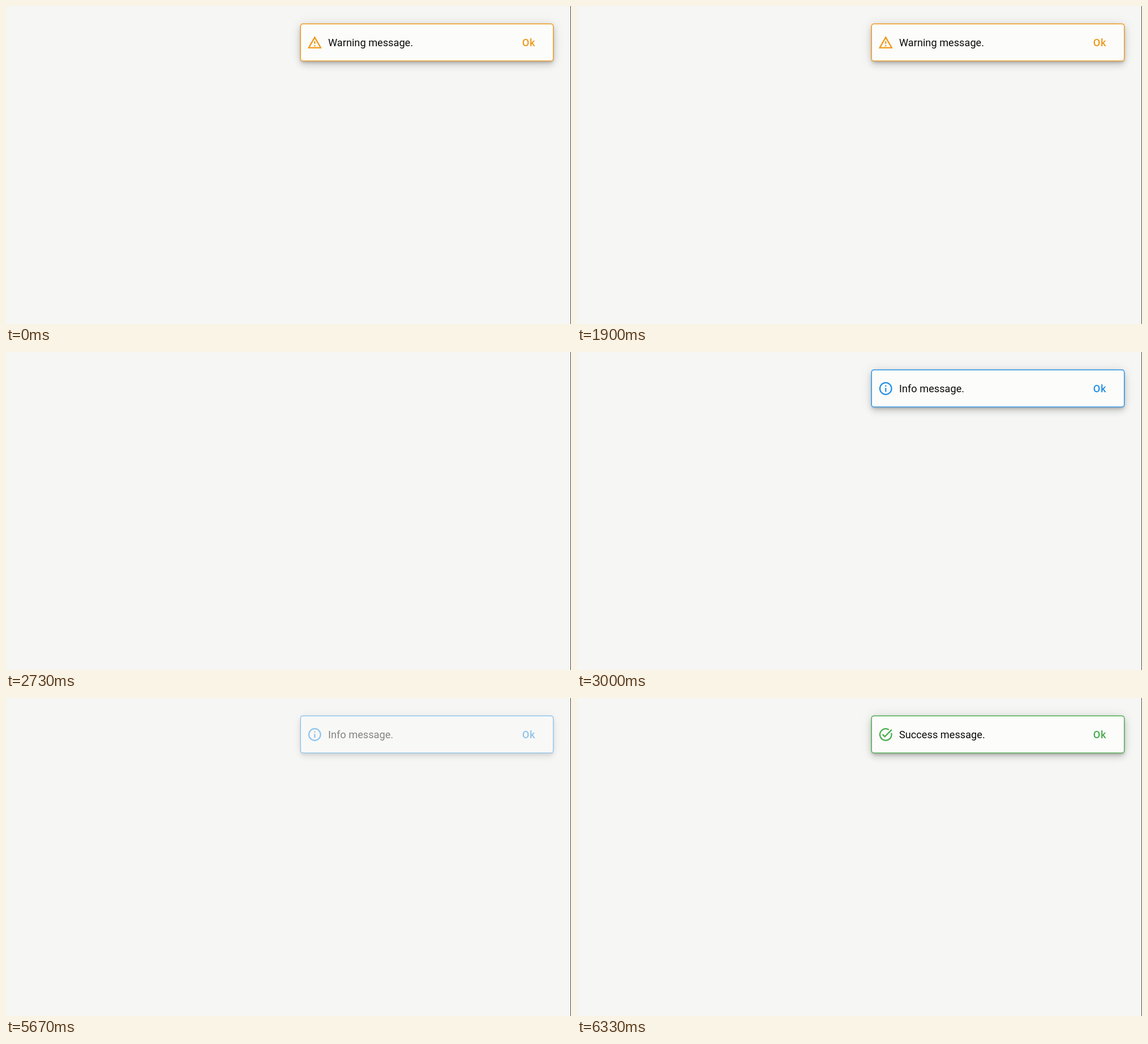
Write an HTML page that moves like this. It is 998 px wide and 561 px high and loops after 8 s.

```html
<!DOCTYPE html>
<html lang="en">
<head>
<meta charset="utf-8">
<title>Snackbar messages</title>
<style>
  html, body { margin: 0; width: 100%; height: 100%; overflow: hidden; }
  #stage {
    position: relative; width: 998px; height: 561px; overflow: hidden;
    background: #f6f6f5;
  }
  #edge {
    position: absolute; right: 0; top: 0; width: 1px; height: 100%;
    background: #484848;
  }
  #card {
    position: absolute; left: 520px; top: 31px; width: 447px; height: 66px;
    border-radius: 4.6px; background: #fcfcfb;
    box-shadow: 0 3.4px 5.7px -1.1px rgba(0, 0, 0, .2),
                0 6.8px 11.4px rgba(0, 0, 0, .14),
                0 1.1px 20.5px rgba(0, 0, 0, .12);
  }
  svg { position: absolute; left: -520px; top: -31px; overflow: visible; }
  text { font: 18.2px Roboto, sans-serif; }
  #outline { fill: none; stroke: currentColor; stroke-width: 1.4; }
  #message { fill: #0c0c0c; }
  #action { font-weight: 500; letter-spacing: .6px; fill: currentColor; }
  #icon { fill: currentColor; }
</style>
</head>
<body>
<div id="stage">
  <div id="edge"></div>
  <div id="card">
    <svg width="998" height="561">
      <rect id="outline" x="520.3" y="31.5" width="446.4" height="65.4" rx="4.2"/>
      <path id="icon" fill-rule="evenodd" transform="translate(531.6 50.8) scale(1.143)"/>
      <text id="message" x="569" y="70.8"></text>
      <text id="action" x="911.8" y="70.8">Ok</text>
    </svg>
  </div>
</div>
<script>
const LOOP = 8000;
const TICK = 200 / 3; // the picture refreshes 15 times a second
const EXIT = 75;
const ENTER = 150;

const [card, icon, message] = ['card', 'icon', 'message'].map(id => document.getElementById(id));

const snacks = [
  { text: 'Warning message.', color: '#ef991a', enter: -ENTER, exit: 2625,
    path: 'M12 2L1 21H23ZM12 5.99L19.53 19H4.47ZM11 16h2v2h-2zM11 10h2v4h-2z' },
  { text: 'Info message.', color: '#2590e4', enter: 2825, exit: 5617,
    path: 'M2 12a10 10 0 1 0 20 0a10 10 0 1 0-20 0zM4 12a8 8 0 1 0 16 0a8 8 0 1 0-16 0zM11 7h2v2h-2zM11 11h2v6h-2z' },
  { text: 'Success message.', color: '#48ac4c', enter: 5825, exit: Infinity,
    path: 'M22 5.18L10.59 16.6L6.35 12.36L7.76 10.95L10.59 13.78L20.59 3.78Z' +
          'M19.79 10.22A8 8 0 1 1 16.28 5.25L17.72 3.81A10 10 0 1 0 21.4 8.61Z' }
];

const clamp = x => Math.min(1, Math.max(0, x));
const easeOut = x => 1 - (1 - x) ** 3;
const easeIn = x => x ** 1.6;

let shown;
function show(snack) {
  if (snack === shown) return;
  shown = snack;
  card.style.color = snack.color;
  icon.setAttribute('d', snack.path);
  message.textContent = snack.text;
}

function draw(now) {
  const time = Math.floor((now % LOOP + 3.4) / TICK) * TICK;
  const snack = snacks.findLast(s => time >= s.enter);
  const entered = easeOut(clamp((time - snack.enter) / ENTER));
  const left = easeIn(clamp((time - snack.exit) / EXIT));
  show(snack);
  card.style.opacity = entered * (1 - left);
  card.style.transform = entered < 1 ? `scale(${0.8 + 0.2 * entered})` : 'none';
}

const start = performance.now();
function frame() {
  draw(performance.now() - start);
  requestAnimationFrame(frame);
}
frame();
</script>
</body>
</html>
```
